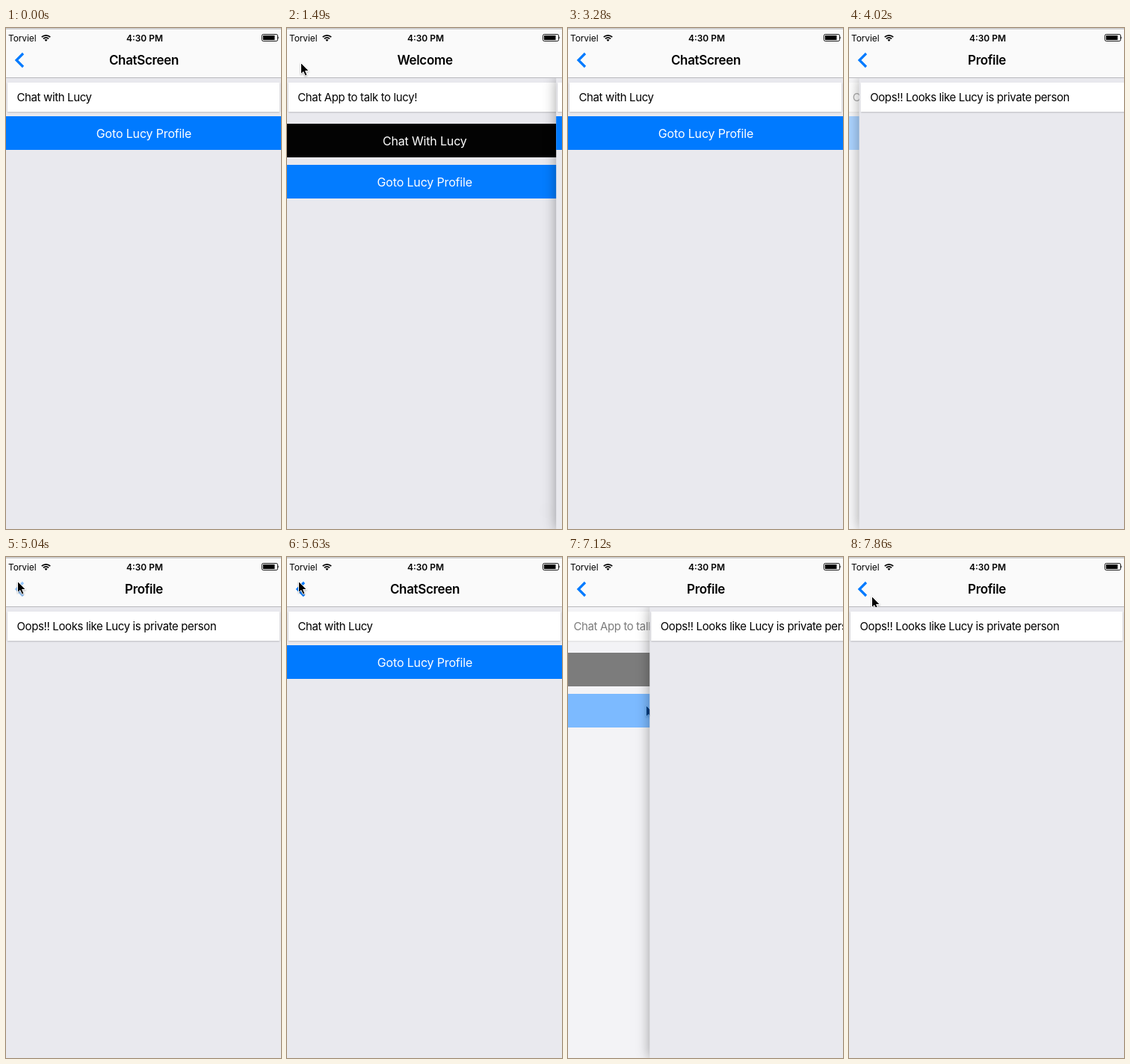
These frames come from a looping animation (368x670 px, 8000 ms). An HTML page:

```html
<!DOCTYPE html>
<html lang="en">
<head>
<meta charset="utf-8">
<title>Chat navigation</title>
<style>
  html, body { margin: 0; width: 100%; height: 100%; overflow: hidden; background: #fff; }
  body { position: relative; font-family: Inter, Roboto, sans-serif; color: #000; }
  #stage { position: absolute; left: 0; top: 0; width: 368px; height: 670px; overflow: hidden; }
  #scenes { position: absolute; top: 67px; width: 368px; height: 603px; overflow: hidden; background: #fff; }
  .scene { position: absolute; inset: 0; background: #e9e9ee; box-shadow: 0 0 16px rgba(0, 0, 0, .36); }
  .card {
    position: absolute; left: 2px; right: 2px; top: 6px; height: 39px;
    background: #fff; box-shadow: 0 1px 2px rgba(0, 0, 0, .2);
    padding-left: 12.5px; font-size: 15px; line-height: 40px; letter-spacing: -.025em; white-space: nowrap;
  }
  .btn {
    position: absolute; left: 0; right: 0; height: 45px; background: #007aff; color: #fff;
    font-size: 16px; line-height: 46px; letter-spacing: -.01em; text-align: center; text-indent: 1px;
  }
  #chat .btn { top: 51px; }
  #home .btn { top: 116px; }
  #home .dark { top: 61px; background: #000; }
  #header {
    position: absolute; left: 0; top: 0; width: 368px; height: 67px; box-sizing: border-box;
    background: #fafafa; border-top: 2px solid #d0d0d1; border-bottom: 1px solid #b9b9bd;
  }
  #header span { position: absolute; white-space: nowrap; line-height: 16px; }
  .network { left: 3px; top: 4px; font-size: 12px; letter-spacing: -.01em; }
  .clock { left: 0; width: 371px; top: 4px; text-align: center; font-size: 12px; font-weight: 600; }
  #header #title {
    left: 0; width: 369px; top: 31px; line-height: 20px; text-align: center;
    font-size: 17px; font-weight: 600; letter-spacing: -.02em;
  }
  #overlay { position: absolute; left: 0; top: 0; }
  .fab { filter: drop-shadow(0 0 2px rgba(0, 0, 0, .18)); }
  #cursor { filter: drop-shadow(0 1px 1px rgba(0, 0, 0, .3)); }
</style>
</head>
<body>
<div id="stage">
  <div id="scenes">
    <div class="scene" id="home">
      <div class="card">Chat App to talk to lucy!</div>
      <div class="btn dark">Chat With Lucy</div>
      <div class="btn" id="homeBtn">Goto Lucy Profile</div>
    </div>
    <div class="scene" id="chat">
      <div class="card">Chat with Lucy</div>
      <div class="btn" id="chatBtn">Goto Lucy Profile</div>
    </div>
    <div class="scene" id="profile">
      <div class="card">Oops!! Looks like Lucy is private person</div>
    </div>
  </div>
  <div id="header">
    <span class="network">Torviel</span>
    <span class="clock">4:30 PM</span>
    <span id="title">ChatScreen</span>
  </div>
  <svg id="overlay" width="368" height="670" fill="none">
    <g stroke="#000" stroke-width="1.8">
      <path d="M47.8 12.2a8 8 0 0 1 11.4 0M50 14.4a5 5 0 0 1 7 0"/>
      <path d="M53.5 18l-2-2.2a3 3 0 0 1 4 0z" fill="#000" stroke="none"/>
    </g>
    <rect x="342.5" y="8.5" width="21" height="9" rx="1.8" stroke="#000" stroke-width=".9"/>
    <path d="M344 10h15.5v6H344zM364.5 11.3q1.6 1.7 0 3.4z" fill="#000"/>
    <path id="back" d="M23 34l-9 9 9 9" stroke="#007aff" stroke-width="3.2"/>
    <circle class="fab" cx="347" cy="645" r="21" fill="#fafafa"/>
    <circle cx="347" cy="645" r="10" fill="#d9d9d9"/>
    <path id="cursor" d="M0 0v15.2l3.4-3.2 2.4 5.4 2.7-1.2-2.4-5.2h4.7z" fill="#000" stroke="#fff" stroke-width="1"/>
  </svg>
</div>
<script>
  const LOOP = 8000, WIDTH = 368, SLIDE = 500;
  const $ = id => document.getElementById(id);
  const titles = { home: 'Welcome', chat: 'ChatScreen', profile: 'Profile' };

  // Screen updates: [first, last, count]
  const bursts = [
    [150, 900, 6], [1190, 1790, 5], [2080, 2230, 2], [2680, 3430, 6],
    [3720, 4600, 7], [5040, 5630, 5], [5930, 6530, 5], [6970, 7860, 7]
  ];

  // Navigation: [start, from, to, isPush, pressed element]
  const navs = [
    [1192, 'chat', 'home', false, 'back'],
    [2640, 'home', 'chat', true, ''],
    [3752, 'chat', 'profile', true, 'chatBtn'],
    [5042, 'profile', 'chat', false, 'back'],
    [5932, 'chat', 'home', false, 'back'],
    [7000, 'home', 'profile', true, 'homeBtn']
  ];

  // Pointer moves: [start, end, x, y]
  const moves = [
    [0, 0, 108.5, 143.5], [0, 900, 18.5, 46.5], [1930, 2230, 139.5, 157.5],
    [2980, 3430, 119.5, 137.5], [4160, 4600, 15.5, 32.5],
    [6080, 6530, 104.5, 198.5], [7400, 7860, 30.5, 52.5]
  ];

  const clamp = v => Math.max(0, Math.min(1, v));
  const smooth = v => v * v * (3 - 2 * v);

  function snap(t) {
    let shown = 0;
    for (const [a, b, n] of bursts) {
      if (t < a) break;
      const step = (b - a) / (n - 1);
      shown = a + step * Math.min(n - 1, Math.floor((t - a) / step + 1e-6));
    }
    return shown;
  }

  // cubic-bezier(.2833, .99, .3183, .99)
  function ease(v) {
    const curve = (s, a, b) => 3 * a * s * (1 - s) ** 2 + 3 * b * s * s * (1 - s) + s ** 3;
    let lo = 0, hi = 1;
    for (let i = 0; i < 24; i++) {
      const mid = (lo + hi) / 2;
      if (curve(mid, .2833, .3183) < v) lo = mid; else hi = mid;
    }
    return v >= 1 ? 1 : curve(lo, .99, .99);
  }

  function place(id, x, opacity, z) {
    const s = $(id).style;
    s.display = 'block';
    s.transform = `translateX(${x}px)`;
    s.opacity = opacity;
    s.zIndex = z;
  }

  function drawScenes(t) {
    const nav = navs.filter(n => n[0] <= t).pop() || [-SLIDE, 'home', 'chat', true];
    const [start, from, to, push] = nav;
    const p = ease(clamp((t - start) / SLIDE));
    for (const id in titles) $(id).style.display = 'none';
    if (p === 1) {
      place(to, 0, 1, 1);
    } else {
      const cover = push ? p : 1 - p;
      place(push ? from : to, -10 * cover, 1 - .7 * cover, 1);
      place(push ? to : from, WIDTH * (1 - cover), 1, 2);
    }
    $('title').textContent = titles[to];
    $('back').style.display = to === 'home' ? 'none' : '';
  }

  function drawPress(t) {
    for (const id of ['back', 'homeBtn', 'chatBtn']) $(id).style.opacity = 1;
    const hit = navs.find(n => n[4] && n[0] > t && n[0] - t < 50);
    if (hit) $(hit[4]).style.opacity = hit[4] === 'back' ? .4 : .6;
  }

  function drawCursor(t) {
    let [, , x, y] = moves[0];
    for (const [a, b, tx, ty] of moves.slice(1)) {
      const k = smooth(clamp((t - a) / (b - a)));
      x += (tx - x) * k;
      y += (ty - y) * k;
    }
    $('cursor').setAttribute('transform', `translate(${x} ${y})`);
  }

  const origin = performance.now();
  function frame() {
    const t = snap((performance.now() - origin) % LOOP);
    drawScenes(t);
    drawPress(t);
    drawCursor(t);
    requestAnimationFrame(frame);
  }
  frame();
</script>
</body>
</html>
```
